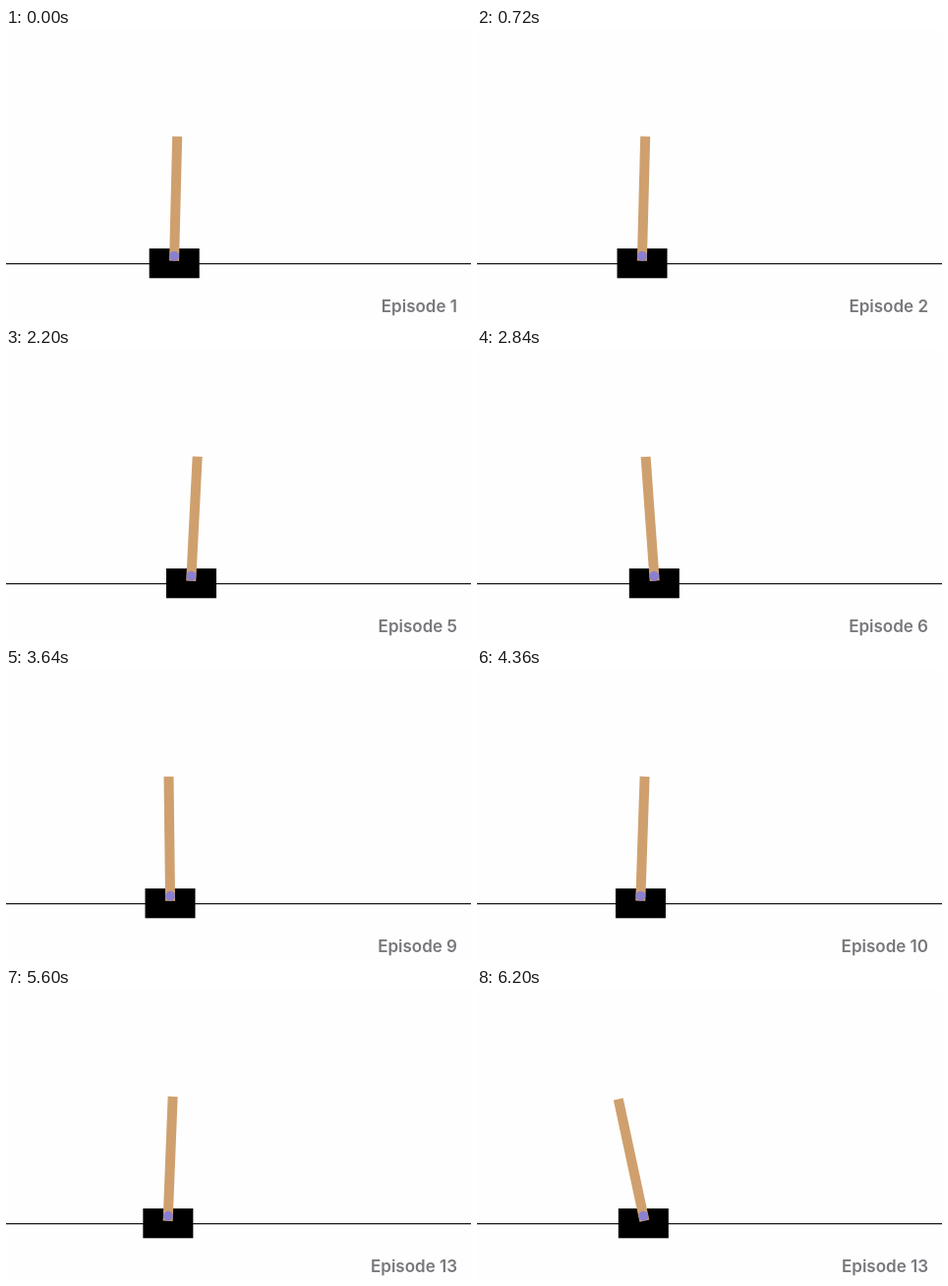
An HTML page for the animation above (7000 ms loop, 473 by 298 pixels).

```html
<!DOCTYPE html>
<html lang="en">
<head>
<meta charset="utf-8">
<title>Cart pole</title>
<style>
  html, body { margin: 0; width: 100%; height: 100%; overflow: hidden; background: #fefefe; }
  svg { display: block; width: 473px; height: 298px; }
  text { font: 600 17px Inter, sans-serif; fill: #79777c; text-anchor: end; }
</style>
</head>
<body>
<svg viewBox="0 0 473 298">
  <rect width="473" height="298" fill="#fefefe"/>
  <rect y="240" width="473" height="1.2" fill="#111"/>
  <g id="cart">
    <rect x="-25.5" y="225" width="51" height="30.3" fill="#000"/>
    <g id="pole">
      <rect x="-5" y="110.7" width="10" height="127" fill="#cfa06e"/>
      <circle cy="232.7" r="5" fill="#8a80d0"/>
    </g>
  </g>
  <text id="label" x="459" y="290"></text>
</svg>
<script>
const LOOP = 7000, STEP = 40, HINGE = 232.7;

// One row per episode; each key is [time ms, cart x, pole angle in degrees].
const episodes = [
  [[0, 171.2, 1.4], [240, 158, 4], [480, 136, 12]],
  [[520, 173, -1], [720, 168, 1.5], [960, 154.5, 12]],
  [[1000, 172, 1], [1160, 175, 0.5], [1320, 182.3, -2.8], [1440, 190, -11]],
  [[1480, 168, -1], [1640, 163, 1], [1840, 168, -12]],
  [[1880, 172, 2], [2040, 181, 1], [2200, 188.5, 2.9], [2360, 184, 12]],
  [[2400, 173, 1], [2640, 174, 0.5], [2840, 180.3, -4.1], [2960, 185, -11]],
  [[3000, 170, 1], [3120, 166.5, 4], [3280, 166, 12]],
  [[3320, 172, -1], [3480, 179, -5], [3600, 184, -12]],
  [[3640, 167, -0.7], [3840, 165, 2], [4120, 176, -12]],
  [[4160, 174, 0], [4440, 164, 3], [4920, 154.5, 12]],
  [[4960, 169.7, 0.4], [5040, 169.2, 0.75], [5240, 158, 12]],
  [[5280, 172, -1], [5480, 178, -12]],
  [[5520, 171, 1], [5720, 156, 4], [5800, 152, 4.5], [6080, 171, -7], [6200, 169.3, -12.1]]
];

const cart = document.getElementById("cart");
const pole = document.getElementById("pole");
const label = document.getElementById("label");

function slope(keys, i, col) {
  const a = keys[Math.max(i - 1, 0)];
  const b = keys[Math.min(i + 1, keys.length - 1)];
  return (b[col] - a[col]) / (b[0] - a[0]);
}

// Cubic Hermite curve through the keys, held after the last one.
function sample(keys, t, col) {
  const last = keys.length - 1;
  if (t >= keys[last][0]) return keys[last][col];
  let i = 0;
  while (t >= keys[i + 1][0]) i++;
  const a = keys[i], b = keys[i + 1];
  const d = b[0] - a[0], u = (t - a[0]) / d, v = 1 - u;
  return v * v * (1 + 2 * u) * a[col] + u * u * (3 - 2 * u) * b[col]
    + u * v * d * (v * slope(keys, i, col) - u * slope(keys, i + 1, col));
}

function draw(ms) {
  const t = Math.floor((ms % LOOP) / STEP) * STEP;
  let n = episodes.length - 1;
  while (episodes[n][0][0] > t) n--;
  const x = sample(episodes[n], t, 1);
  const angle = sample(episodes[n], t, 2);
  cart.setAttribute("transform", `translate(${x.toFixed(2)} 0)`);
  pole.setAttribute("transform", `rotate(${angle.toFixed(2)} 0 ${HINGE})`);
  label.textContent = "Episode " + (n + 1);
}

const start = performance.now();
function tick() {
  draw(performance.now() - start);
  requestAnimationFrame(tick);
}
tick();
</script>
</body>
</html>
```
